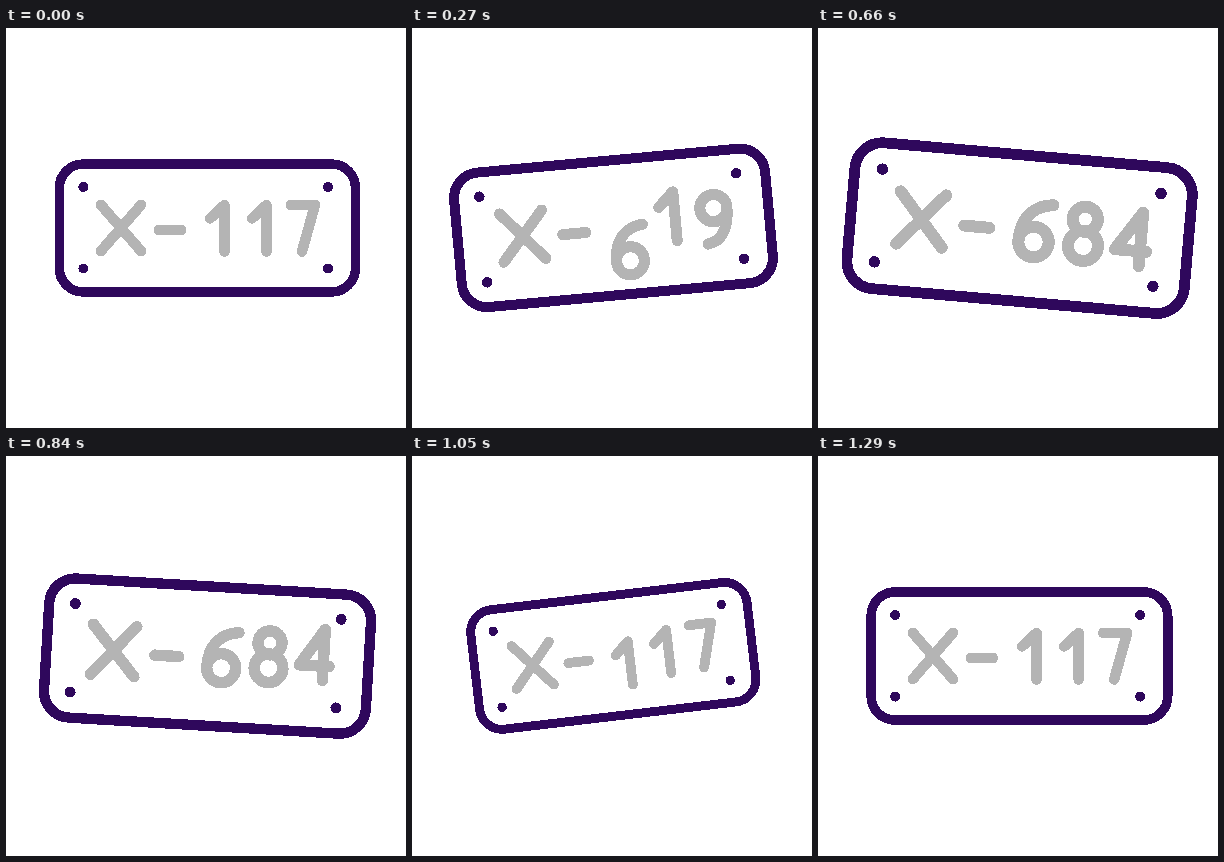
Write an HTML page that moves like this. It is 400 by 400 pixels and loops after 1.32 s.

```html
<!DOCTYPE html>
<html lang="en">
<head>
<meta charset="utf-8">
<title>Number plate</title>
<style>
  html, body { margin: 0; width: 100%; height: 100%; overflow: hidden; background: #fff; }
  svg { display: block; width: 100vw; height: 100vh; fill: none; stroke-linecap: round; stroke-linejoin: round; shape-rendering: crispEdges; }
  .ink { stroke: #b4b4b4; stroke-width: 10.5; }
</style>
</head>
<body>
<svg viewBox="0 0 400 400">
  <g id="plate">
    <rect x="53.3" y="136" width="296.2" height="128" rx="24" stroke="#2f085c" stroke-width="9.5"/>
    <g fill="#2f085c">
      <circle cx="77.4" cy="159" r="5"/><circle cx="322" cy="159" r="5"/>
      <circle cx="77.4" cy="240.5" r="5"/><circle cx="322" cy="240.5" r="5"/>
    </g>
    <g class="ink">
      <path d="M95 177L135 223M135 177L95 223M153 202H175"/>
      <path class="digit"/><path class="digit"/><path class="digit"/>
    </g>
  </g>
</svg>
<script>
const LOOP = 1320;
const plate = document.getElementById('plate');
const digits = [...document.querySelectorAll('.digit')];

const ring = (x, y, r) => `M${x - r} ${y}a${r} ${r} 0 1 0 ${2 * r} 0a${r} ${r} 0 1 0 ${-2 * r} 0`;
const one = x => `M${x - 14.5} 190.5L${x} 177V223.5`;
const six = 'M229 177.5C213 179 201.3 190 201.3 211' + ring(214.6, 211, 13.3);
const eight = ring(258, 187.3, 11) + ring(258, 210.6, 13.2);
const nine = ring(297.5, 190, 12.9) + 'M310.4 190Q309.5 221 289.5 223.5';
const four = 'M308 224V177.2L286 211H313.5';
const seven = 'M285 177H309L296 223.5';

// For each digit: its shapes in turn and the start time of each swap
const reels = [
  { shapes: [one(218.5), six, one(218.5)], starts: [75, 825] },
  { shapes: [one(260.5), eight, one(260.5)], starts: [211, 805] },
  { shapes: [seven, nine, four, seven], starts: [0, 375, 752] },
];

// Keyframes are [time, value], eased in and out
const turn = [[0, 0], [200, -6.8], [510, 5], [770, 5], [1080, -7], [1280, 0]];
const zoom = [[0, 1], [120, 1], [480, 1.143], [720, 1.143], [1080, .935], [1280, 1.002], [LOOP, 1]];
const hop = [[0, 0], [90, -8], [180, 24], [260, 0]];
const SWAP = 180;

function track(keys, t) {
  const i = keys.findIndex(k => k[0] > t);
  if (i < 0) return keys[keys.length - 1][1];
  if (i === 0) return keys[0][1];
  const [t0, a] = keys[i - 1], [t1, b] = keys[i];
  const u = (t - t0) / (t1 - t0);
  return a + (b - a) * u * u * (3 - 2 * u);
}

function draw(now) {
  const t = now % LOOP;
  plate.setAttribute('transform',
    `translate(200 200) rotate(${track(turn, t)}) scale(${track(zoom, t)}) translate(-200 -200)`);
  reels.forEach(({ shapes, starts }, i) => {
    const y = starts.reduce((sum, s) => sum + track(hop, t - s), 0);
    digits[i].setAttribute('d', shapes[starts.filter(s => t >= s + SWAP).length]);
    digits[i].setAttribute('transform', `translate(0 ${y})`);
  });
  requestAnimationFrame(draw);
}
draw(0);
</script>
</body>
</html>
```
